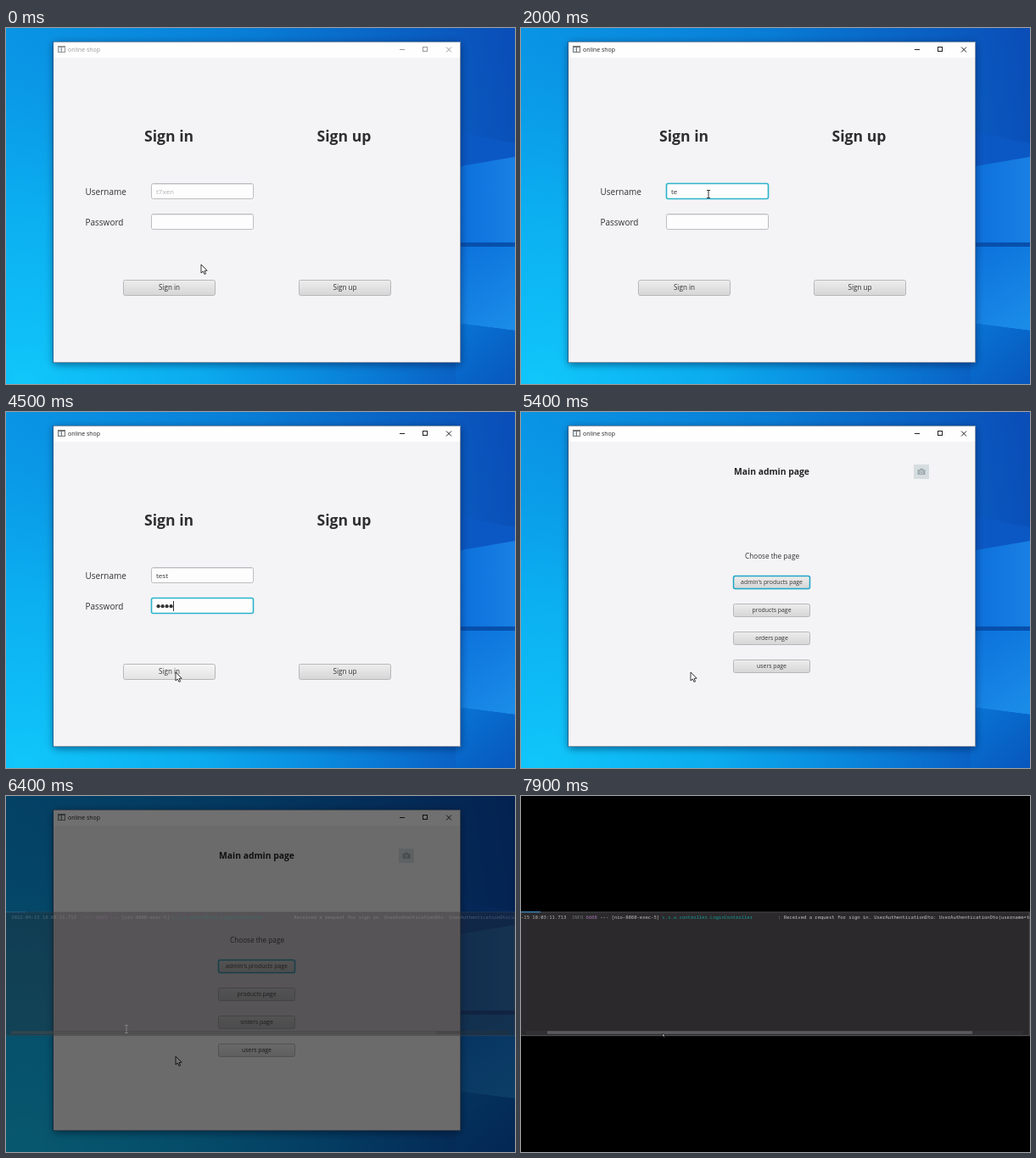
An HTML page with a canvas that plays this animation: 600x420 px, repeating every 8 s.

```html
<!DOCTYPE html>
<html lang="en">
<head>
<meta charset="utf-8">
<title>Online shop sign in</title>
<style>
html, body { margin: 0; width: 100%; height: 100%; overflow: hidden; background: #000; }
canvas { display: block; }
</style>
</head>
<body>
<canvas id="stage" width="600" height="420"></canvas>
<script>
const ctx = document.getElementById('stage').getContext('2d');
const LOOP = 8000, STEP = 100;
const SANS = '"Open Sans", "Noto Sans", sans-serif';
const MONO = '"Noto Sans Mono", "DejaVu Sans Mono", monospace';
const CLICK_USER = 1200, CLICK_PASS = 2900, OPEN_ADMIN = 4700;
const pointerPath = [[0, 230, 279], [300, 230, 279], [1000, 221, 196], [2500, 221, 196],
  [2900, 215.5, 227], [3900, 215.5, 227], [4500, 200, 307], [LOOP, 200, 307]];
const dragPath = [[7000, 142, 275], [7400, 142, 280], [7900, 167, 280]];

const clamp = v => Math.max(0, Math.min(1, v));
const ease = v => v * v * (3 - 2 * v);

function follow(path, t) {
  let a = path[0];
  for (const b of path) {
    if (t < b[0]) {
      const k = ease(clamp((t - a[0]) / (b[0] - a[0])));
      return [a[1] + (b[1] - a[1]) * k, a[2] + (b[2] - a[2]) * k];
    }
    a = b;
  }
  return [a[1], a[2]];
}

function rect(x, y, w, h, fill) {
  ctx.fillStyle = fill;
  ctx.fillRect(x, y, w, h);
}

function poly(points, fill, stroke) {
  ctx.beginPath();
  points.forEach(([x, y]) => ctx.lineTo(x, y));
  ctx.closePath();
  ctx.fillStyle = fill;
  ctx.fill();
  if (stroke) {
    ctx.strokeStyle = stroke;
    ctx.lineWidth = 0.9;
    ctx.stroke();
  }
}

function line(points, color, width = 1) {
  ctx.beginPath();
  points.forEach(([x, y], i) => i % 2 ? ctx.lineTo(x, y) : ctx.moveTo(x, y));
  ctx.strokeStyle = color;
  ctx.lineWidth = width;
  ctx.stroke();
}

function text(s, x, y, size, color = '#333', weight = 400, align = 'left') {
  ctx.font = `${weight} ${size}px ${SANS}`;
  ctx.textAlign = align;
  ctx.fillStyle = color;
  ctx.fillText(s, x, y);
}

function box(x, y, w, h, fill, border, width = 1) {
  ctx.beginPath();
  ctx.roundRect(x + 0.5, y + 0.5, w - 1, h - 1, 2);
  ctx.fillStyle = fill;
  ctx.fill();
  ctx.strokeStyle = border;
  ctx.lineWidth = width;
  ctx.stroke();
}

function gradient(x0, y0, x1, y1, ...colors) {
  const g = ctx.createLinearGradient(x0, y0, x1, y1);
  colors.forEach((c, i) => g.addColorStop(i / (colors.length - 1), c));
  return g;
}

function button(label, x, y, w, h, size, focused, hover) {
  const top = hover ? '#f6f6f6' : '#eeeeee', end = hover ? '#e2e2e2' : '#d5d5d6';
  box(x, y, w, h, gradient(0, y, 0, y + h, top, end), focused ? '#1ba6c6' : '#b7b7b9', focused ? 1.5 : 1);
  text(label, x + w / 2, y + h / 2 + size * 0.36, size, '#333', 400, 'center');
}

function field(y, focused) {
  box(171, y, 121, 19, '#fdfdfe', focused ? '#2bb4ca' : '#bdbdc1', focused ? 1.6 : 1);
  if (!focused) line([[173, y + 1.5], [290, y + 1.5]], '#e4e4e7');
}

function arrow(x, y, s = 1) {
  const shape = [[0, 0], [0, 10], [2.3, 8], [4, 11.5], [5.6, 10.8], [4, 7.4], [7.1, 7.2]];
  poly(shape.map(([a, b]) => [x + a * s, y + b * s]), '#fff', '#222');
}

function ibeam(x, y, color) {
  line([[x, y - 4], [x, y + 4], [x - 2, y - 4.5], [x + 2, y - 4.5], [x - 2, y + 4.5], [x + 2, y + 4.5]], color);
}

function desktop() {
  rect(0, 0, 600, 420, gradient(0, 80, 600, 0, '#0993e3', '#087bd5', '#0a4db7'));
  const glow = ctx.createRadialGradient(20, 420, 0, 20, 420, 520);
  glow.addColorStop(0, '#10c7fa');
  glow.addColorStop(0.4, 'rgba(12,184,245,.75)');
  glow.addColorStop(1, 'rgba(10,140,230,0)');
  rect(0, 0, 600, 420, glow);
  poly([[530, 122], [600, 136], [600, 152], [530, 164]], '#0b58c4');
  poly([[530, 164], [600, 152], [600, 253], [530, 253]], gradient(536, 0, 600, 0, '#0d70dc', '#1980e4'));
  poly([[530, 258], [600, 258], [600, 357], [530, 348]], gradient(536, 258, 600, 350, '#0c72dc', '#1b8ce8'));
  rect(530, 253, 70, 5, '#0750ac');
  poly([[530, 348], [600, 357], [600, 420], [530, 420]], gradient(536, 350, 600, 420, '#0873d4', '#0857bd'));
}

function frame(active) {
  ctx.save();
  ctx.shadowColor = 'rgba(0,20,60,.55)';
  ctx.shadowBlur = 9;
  ctx.shadowOffsetY = 2;
  rect(56, 16, 480, 379, '#f4f3f5');
  ctx.restore();
  rect(56, 16, 480, 19, '#fefefe');
  ctx.strokeStyle = 'rgba(30,60,100,.55)';
  ctx.lineWidth = 1;
  ctx.strokeRect(55.5, 16.5, 480, 378);
  const ink = active ? '#222' : '#999';
  rect(61, 21, 9, 8, active ? '#777' : '#999');
  rect(62, 23, 3, 5, '#dce6ee');
  rect(66, 23, 3, 5, '#f8f8f8');
  text('online shop', 73, 28, 6.95, ink);
  line([[464, 25.5], [470, 25.5], [519, 22.5], [525, 28.5], [525, 22.5], [519, 28.5]], ink);
  ctx.strokeRect(491.5, 22.5, 5, 5);
}

function signPage(t, [px, py]) {
  text('Sign in', 163, 134, 17.6, '#2e2e30', 700);
  text('Sign up', 366.5, 134, 17.6, '#2e2e30', 700);
  text('Username', 93.5, 197, 10);
  text('Password', 93.5, 233, 10);
  const userFocus = t >= CLICK_USER && t < CLICK_PASS, passFocus = t >= CLICK_PASS;
  field(183, userFocus);
  field(219, passFocus);

  const typed = 'test'.slice(0, Math.max(0, Math.floor((t - 1600) / 200)));
  if (typed || userFocus) text(typed, 177, 196, 8);
  else text('t7xen', 177, 196, 8, '#b3b3b6');
  const dots = Math.max(0, Math.min(4, Math.floor((t - 2900) / 200)));
  for (let i = 0; i < dots; i++) {
    ctx.beginPath();
    ctx.arc(179.6 + i * 5, 229.2, 2.1, 0, 7);
    ctx.fillStyle = '#333';
    ctx.fill();
  }
  const blink = t % 1000 >= 500;
  if (userFocus && blink) {
    ctx.font = `8px ${SANS}`;
    const x = 177.5 + ctx.measureText(typed).width;
    line([[x, 187], [x, 198]], '#333');
  }
  if (passFocus && blink) line([[177.5 + dots * 5, 223], [177.5 + dots * 5, 235]], '#333');

  const hover = px > 138 && px < 247 && py > 297 && py < 316;
  button('Sign in', 138, 297, 109, 19, 8.1, false, hover);
  button('Sign up', 345, 297, 109, 19, 8.1);
}

function adminPage() {
  text('Main admin page', 251, 74, 10.35, '#222', 700);
  rect(463, 62, 18, 17, '#d5dde0');
  rect(467.5, 68, 9, 6, '#a0acb1');
  rect(470, 66.7, 4, 2, '#a0acb1');
  ctx.beginPath();
  ctx.arc(472, 71, 1.7, 0, 7);
  ctx.strokeStyle = '#d5dde0';
  ctx.lineWidth = 0.8;
  ctx.stroke();
  text('Choose the page', 264, 172.5, 8.2);
  ["admin's products page", 'products page', 'orders page', 'users page']
    .forEach((s, i) => button(s, 250, 193 + i * 33, 91, 16, 6.9, i === 0));
}

function shop(t) {
  desktop();
  frame(t >= CLICK_USER);
  const pointer = follow(pointerPath, t), [x, y] = pointer;
  if (t < OPEN_ADMIN) signPage(t, pointer);
  else adminPage();
  const inField = x > 171 && x < 292 && (y > 183 && y < 202 || y > 219 && y < 238);
  if (inField && t < OPEN_ADMIN) ibeam(x, y, '#333');
  else arrow(x, y);
}

function log(t) {
  const [x, y] = follow(dragPath, t), drag = x - 142;
  rect(0, 137, 600, 146, '#2b292b');
  rect(0, 136.5, 600, 1, '#48484a');
  rect(0, 136, 23, 1.6, '#36719f');
  rect(0, 282, 600, 1.2, '#515153');
  rect(598.8, 137, 1.2, 146, '#454547');
  const start = 6.3 - drag * 1.184;
  ctx.font = `5.55px ${MONO}`;
  ctx.textAlign = 'left';
  [[0, '2022-04-15 18:03:11.713', '#c2c2c2'], [25, 'INFO', '#717b73'], [30, '6668', '#a878b3'],
    [35, '--- [nio-8080-exec-5]', '#bdbdbd'], [57, 'c.s.a.controller.LoginController', '#149b96'],
    [98, ': Received a request for sign in. UserAuthenticationDto: UserAuthenticationDto(username=test, password=test)', '#c6c6c6']
  ].forEach(([col, s, color]) => {
    ctx.fillStyle = color;
    ctx.fillText(s, start + col * 3.33, 145);
  });
  rect(6, 277, 586, 4, '#313032');
  rect(6 + drag, 277.3, 501, 3.5, '#5b5b5d');
  if (y < 277) ibeam(x, y, '#ddd');
  else arrow(x, y, 0.4);
}

function draw(now) {
  const t = Math.floor(now % LOOP / STEP) * STEP;
  const fade = clamp((t - 6105) / 530);
  if (fade < 1) shop(t);
  rect(0, 0, 600, 420, `rgba(0,0,0,${fade})`);
  if (fade > 0) {
    ctx.globalAlpha = fade / (fade + (1 - fade) * 2.5);
    log(t);
    ctx.globalAlpha = 1;
  }
}

const began = performance.now();
(function tick() {
  draw(performance.now() - began);
  requestAnimationFrame(tick);
})();
</script>
</body>
</html>
```
